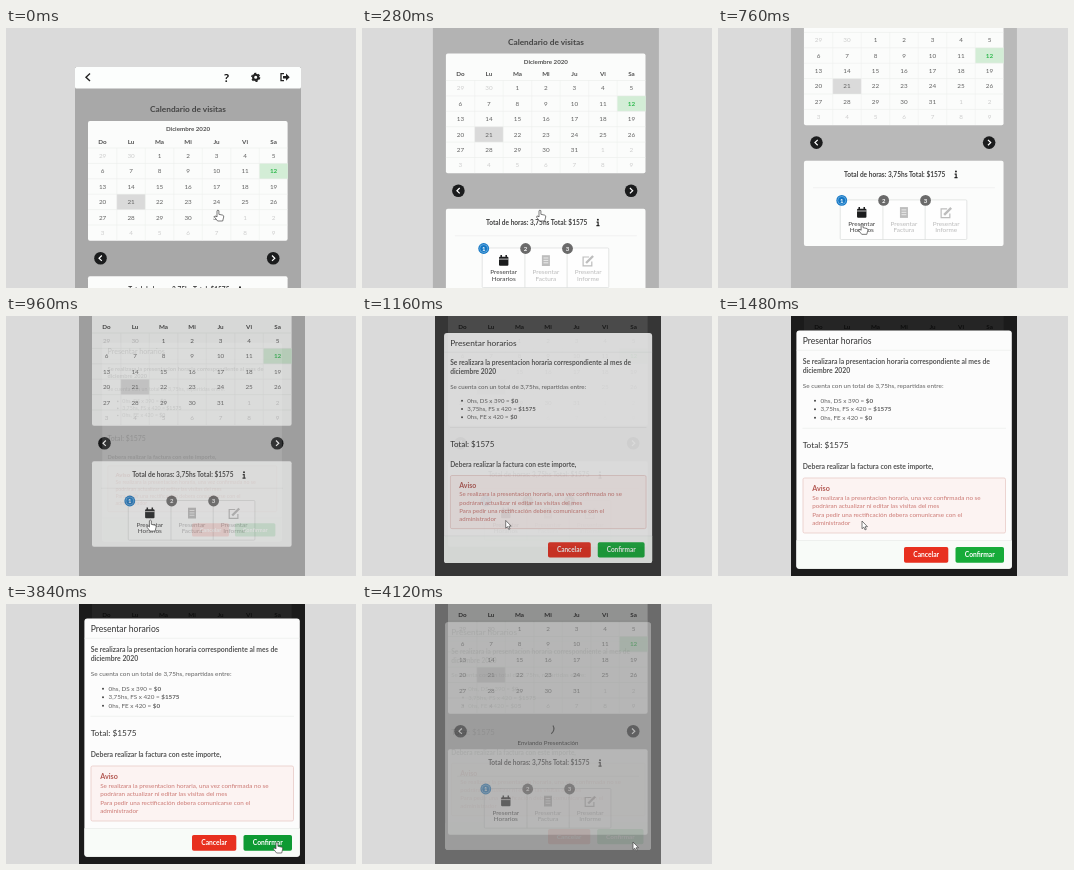
Recreate the animation shown at these times as an HTML page. Size 350 by 260 pixels, loop 4160 ms.

```html
<!DOCTYPE html>
<html lang="es">
<head>
<meta charset="utf-8">
<title>Calendario de visitas</title>
<style>
  html, body { margin: 0; width: 100%; height: 100%; overflow: hidden; background: #dadada; }
  svg { display: block; width: 350px; height: 260px; font: 6.4px Lato, sans-serif; }
  .b { font-weight: 700; }
</style>
</head>
<body>
<svg id="stage" viewBox="0 0 350 260">
  <g id="page"></g>
  <rect id="dim" x="73" width="226" height="260"/>
  <g id="modal"></g>
  <g id="cursor" stroke="#444" stroke-width=".7" stroke-linejoin="round" fill="#fff">
    <path id="hand" d="M0 .7Q1-.5 1.9.7V4.3L5.9 5.2Q7 5.6 6.7 7L5.7 11H.6L-2.4 7.2Q-2.6 5.7-1 6.1L0 7Z"/>
    <path id="arrow" d="M0 0V7.7L1.8 6.2 3 8.9 4.3 8.3 3.1 5.7H5.5Z"/>
  </g>
</svg>
<script>
const LOOP = 4160, STEP = 40;
const $ = id => document.getElementById(id);
const rect = (x, y, w, h, fill, extra = '') =>
  `<rect x="${x}" y="${y}" width="${w}" height="${h}" fill="${fill}" ${extra}/>`;
const circle = (x, y, r, fill, extra = '') =>
  `<circle cx="${x}" cy="${y}" r="${r}" fill="${fill}" ${extra}/>`;
const line = (d, color, width = .5) =>
  `<path d="${d}" fill="none" stroke="${color}" stroke-width="${width}"/>`;
const text = (x, y, content, { size = 6.4, fill = '#606060', bold = false, mid = false } = {}) =>
  `<text x="${x}" y="${y}" font-size="${size}" fill="${fill}" class="${bold ? 'b' : ''}"
    text-anchor="${mid ? 'middle' : 'start'}">${content}</text>`;

function header() {
  return rect(69, 39, 226, 21.5, '#fcfefd', 'rx="1.5"') +
    line('M84 45.5L80 49.2 84 53', '#222', 1.4) +
    text(220.5, 53.5, '?', { size: 12, fill: '#111', bold: true, mid: true }) +
    circle(249.7, 49.3, 2.6, 'none', 'stroke="#222" stroke-width="2.1"') +
    circle(249.7, 49.3, 4, 'none', 'stroke="#222" stroke-width="1.2" stroke-dasharray="2.2 1.99"') +
    line('M278 45.7H275V52.7H278', '#222', 1.3) +
    '<path d="M277 48H280V45.6L283.7 49.2 280 52.8V50.4H277Z" fill="#222"/>';
}

function calendar() {
  const left = 82.3, top = 120, cw = 28.5, rh = 15.4;
  const opts = { size: 6.3, mid: true };
  let out = rect(82, 93, 199.6, 119.8, '#fbfcfb', 'rx="2"') +
    text(182, 103.3, 'Diciembre 2020', { ...opts, size: 6.2, fill: '#505050', bold: true });
  ['Do', 'Lu', 'Ma', 'Mi', 'Ju', 'Vi', 'Sa'].forEach((day, i) =>
    out += text(left + cw * (i + .5), 115.7, day, { ...opts, fill: '#505050', bold: true }));
  for (let i = 0; i < 42; i++) {
    const x = left + i % 7 * cw, y = top + Math.floor(i / 7) * rh;
    const day = (i + 28) % 30 + 1, inMonth = i > 1 && i < 33;
    const label = i < 2 ? day : inMonth ? i - 1 : i - 32;
    const green = i === 13, today = i === 22;
    if (green || today) out += rect(x, y, cw, rh, green ? '#d3edd6' : '#dadada');
    out += text(x + cw / 2, y + 9.9, label,
      { ...opts, fill: green ? '#2cb84c' : inMonth ? '#606060' : '#ccc', bold: green });
  }
  for (let r = 0; r < 6; r++) out += line(`M82 ${top + r * rh}h199.6`, '#e6e9e7');
  for (let c = 1; c < 7; c++) out += line(`M${left + c * cw} ${top}v92.6`, '#eceeed');
  return out;
}

function arrows() {
  return circle(94.5, 230.2, 6.3, '#1b1c1d') + line('M95.8 227.5L93 230.2 95.8 232.9', '#fff', 1.2) +
    circle(267.2, 230.2, 6.3, '#1b1c1d') + line('M266 227.5L268.8 230.2 266 232.9', '#fff', 1.2);
}

function stepIcon(i, x, color) {
  if (i === 0) return rect(x - 4.7, 296.3, 9.4, 9, color, 'rx="1"') +
    line(`M${x - 2.5} 294.5v3M${x + 2.5} 294.5v3`, color, 1.5) +
    line(`M${x - 4.7} 298.6h9.4`, '#fff', .7);
  if (i === 1) return rect(x - 4, 294.7, 8, 10.8, color) +
    line(`M${x - 2.4} 297.5h4.8m-4.8 2.4h4.8m-4.8 2.4h4.8`, '#fff', .7);
  return line(`M${x + 1} 296.5H${x - 5}V305.3H${x + 3.7}V301`, color, 1.2) +
    line(`M${x - 2} 302.5L${x + 5} 295.5`, color, 2.4);
}

function summary() {
  let out = rect(82, 248.3, 199.6, 85.4, '#fbfcfb', 'rx="2"') +
    text(172.8, 264.4, 'Total de horas: 3,75hs Total: $1575', { size: 6.55, fill: '#404040', bold: true, mid: true }) +
    circle(234, 259.2, 1, '#222') + line('M232.7 261.7H234.2V265M232.5 265.2H235.6', '#222', 1.2) +
    line('M91 275.3H273', '#e6e6e6') +
    rect(118.3, 287.5, 126.6, 39.6, '#fefefe', 'stroke="#d9dcda" stroke-width=".7" rx="1"');
  ['Horarios', 'Factura', 'Informe'].forEach((name, i) => {
    const edge = 118.8 + i * 42.2, x = edge + 21, color = i ? '#bdbdbd' : '#1b1c1d';
    const badgeX = edge + 1 - i * .3;
    const label = { fill: i ? '#bbb' : '#404040', mid: true };
    if (i) out += line(`M${edge} 287.5v39.6`, '#d9dcda', .7);
    out += stepIcon(i, x, color) + text(x, 313.5, 'Presentar', label) + text(x, 320, name, label) +
      circle(badgeX, 288, 5.4, i ? '#6a6a6a' : '#1477c4');
    if (!i) out += circle(badgeX, 288, 4, 'none', 'stroke="#8fc4ec" stroke-width=".6"');
    out += text(badgeX, 290.2, i + 1, { size: 6, fill: '#fff', bold: true, mid: true });
  });
  return out;
}

function button(x, w, fill, label, id) {
  return rect(x, 231, w, 15.8, fill, `rx="1.8" id="${id}"`) +
    text(x + w / 2, 241.1, label, { size: 6.7, fill: '#fff', bold: true, mid: true });
}

const modalBox = fill => rect(78.4, 14.5, 215.4, 238.2, fill, 'rx="3"');

function modal() {
  const strong = { size: 6.85, fill: '#555', bold: true };
  const title = { size: 8.6, fill: '#333' };
  let out = modalBox('#fcfcfc') +
    '<path d="M78.4 224.5H293.8V249.7Q293.8 252.7 290.8 252.7H81.4Q78.4 252.7 78.4 249.7Z" fill="#f8fbf8"/>' +
    line('M78.4 34.3H293.8M78.4 224.5H293.8M84.5 112.3H288', '#e2e4e3') +
    text(84.7, 27.6, 'Presentar horarios', title) +
    text(84.7, 47.8, 'Se realizara la presentacion horaria correspondiente al mes de', strong) +
    text(84.7, 56.7, 'diciembre 2020', strong) +
    text(84.7, 72, 'Se cuenta con un total de 3,75hs, repartidas entre:') +
    text(84.7, 132.2, 'Total: $1575', { ...title, size: 8.3 }) +
    text(84.7, 153.3, 'Debera realizar la factura con este importe,', strong) +
    rect(85, 162, 202.5, 55, '#fcf3f2', 'stroke="#e6c4c1" stroke-width=".7" rx="1.5"') +
    text(94.2, 175, 'Aviso', { size: 7.2, fill: '#b35852', bold: true });
  [['0hs, DS x 390', '$0'], ['3,75hs, FS x 420', '$1575'], ['0hs, FE x 420', '$0']].forEach(([item, sum], i) =>
    out += circle(97, 84.7 + i * 8.5, 1, '#444') +
      text(102.5, 86.9 + i * 8.5, `${item} = <tspan class="b">${sum}</tspan>`, { size: 6.3 }));
  ['Se realizara la presentacion horaria, una vez confirmada no se',
    'podráran actualizar ni editar las visitas del mes',
    'Para pedir una rectificación debera comunicarse con el',
    'administrador'].forEach((row, i) =>
    out += text(94.2, 183.5 + i * 8.6, row, { size: 6.3, fill: '#cc7a75' }));
  return out + button(186, 44.3, '#e8301f', 'Cancelar', 'cancel') +
    button(237.5, 48.5, '#16ab39', 'Confirmar', 'confirm') +
    `<g id="loader"><g opacity=".8">${modalBox('#fff')}</g>` +
    '<path id="spinner" d="M186 119.7A6.2 6.2 0 0 1 192.2 125.9" fill="none" stroke="#333" stroke-width="1.2"/>' +
    text(186, 142.5, 'Enviando Presentación', { fill: '#222', mid: true }) + '</g>';
}

$('page').innerHTML = rect(69, 39, 226, 400, '#b9b9b9', 'id="panel"') + header() +
  text(182, 84, 'Calendario de visitas', { size: 8.3, fill: '#444', bold: true, mid: true }) +
  calendar() + arrows() + summary();
$('modal').innerHTML = modal();

const ease = p => p * p * (3 - 2 * p);

// Eased value at time t along [time, value] keys.
function track(t, ...keys) {
  if (t <= keys[0][0]) return keys[0][1];
  for (let i = 1; i < keys.length; i++) {
    const [t0, a] = keys[i - 1], [t1, b] = keys[i];
    if (t < t1) return a + (b - a) * ease((t - t0) / (t1 - t0));
  }
  return keys[keys.length - 1][1];
}

function draw(t) {
  const x = track(t, [0, 0], [560, 3.8], [880, 4]);
  const y = track(t, [0, 0], [560, -135], [600, -135], [880, -103]);
  $('page').setAttribute('transform', `translate(${x} ${y})`);
  const gray = track(t, [0, 168], [480, 185]);
  $('panel').setAttribute('fill', `rgb(${gray},${gray},${gray})`);

  // The dialog grows and drops slightly into place, then shrinks away.
  const leaving = t > 3800;
  const shown = leaving ? track(t, [3940, 1], [4300, 0]) : track(t, [850, 0], [1270, 1]);
  const opacity = leaving ? track(t, [3920, 1], [4248, 0]) : track(t, [875, 0], [1270, 1]);
  const scale = leaving ? .91 + .09 * shown : .8 + .2 * shown;
  const lift = leaving ? -3 * (1 - shown) : -9 * (1 - shown);
  $('dim').setAttribute('opacity', .85 * shown);
  $('modal').setAttribute('opacity', opacity);
  $('modal').setAttribute('transform',
    `translate(186 ${133.5 + lift}) scale(${scale}) translate(-186 -133.5)`);
  $('loader').setAttribute('opacity', track(t, [3840, 0], [3960, 1]));
  $('spinner').setAttribute('transform', `rotate(${(t - 4100) * .6 + 45} 186 125.9)`);

  const cx = track(t, [0, 211], [560, 143], [1480, 144], [1680, 144], [2080, 270], [3840, 270], [4000, 271]);
  const cy = track(t, [0, 182], [600, 182], [880, 204], [1480, 205], [1680, 205], [2080, 238]);
  const pointing = t < 1000 || t >= 2000 && t < 4000;
  $('cursor').setAttribute('transform', `translate(${cx} ${cy})`);
  $('hand').style.display = pointing ? '' : 'none';
  $('arrow').style.display = pointing ? 'none' : '';
  $('confirm').setAttribute('fill', t >= 2000 ? '#0d9a33' : '#16ab39');
}

const start = performance.now();
function frame() {
  const t = (performance.now() - start) % LOOP;
  draw(Math.floor(t / STEP) * STEP);
  requestAnimationFrame(frame);
}
frame();
</script>
</body>
</html>
```
